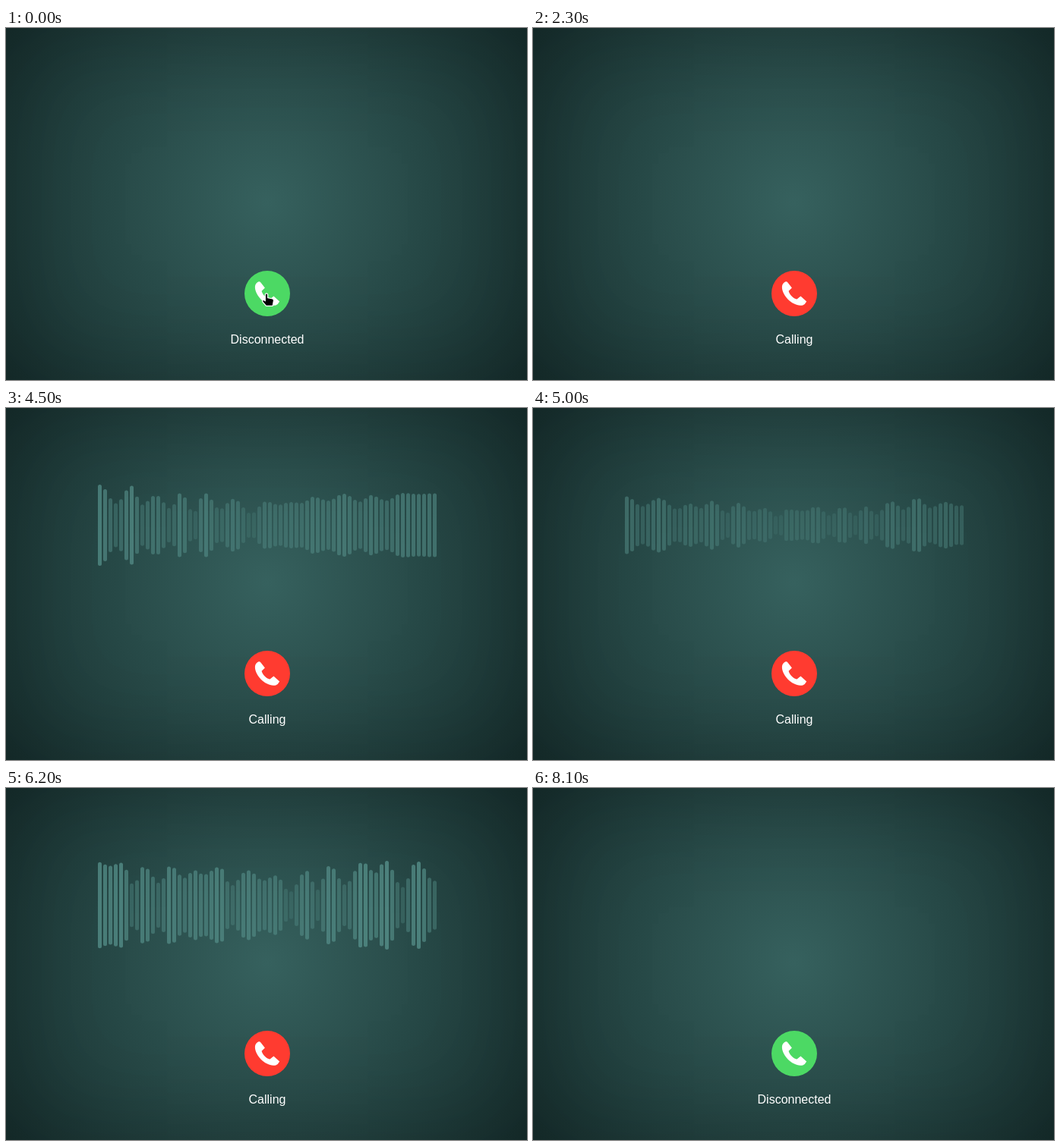
An HTML page for the animation above (9300 ms loop, 686 px wide and 464 px high).

```html
<!DOCTYPE html>
<html lang="en">
<head>
<meta charset="utf-8">
<title>Voice call</title>
<style>
  html, body { margin: 0; width: 100%; height: 100%; overflow: hidden; }
  body {
    background: radial-gradient(circle at 344px 230px, #36615e, #183130 415px);
    box-shadow: inset 0 0 150px rgba(0, 0, 0, .25);
  }
  svg { display: block; width: 686px; height: 464px; }
  text { font: 16px "Liberation Sans", Arial, sans-serif; fill: #fff; text-anchor: middle; }
  .bars { fill: #5a9690; }
  .button, text, .cursor { animation: 9300ms step-end infinite; }
  .button { animation-name: button; }
  .idle { animation-name: idle; }
  .matching { animation-name: matching; }
  .calling { animation-name: calling; }
  .hand { animation-name: hand; }
  .arrow { animation-name: arrow; }
  .cursor { fill: #000; stroke: #fff; stroke-width: 1.2; stroke-linejoin: round; }

  @keyframes button {
    0%, 80.64%, to { fill: #4cd964; }
    23.65%, 79.56% { fill: #a68a4a; }
    24.73% { fill: #ff3b30; }
  }
  @keyframes idle {
    0%, 79.56%, to { visibility: visible; }
    8.6% { visibility: hidden; }
  }
  @keyframes matching {
    0%, 23.65%, to { visibility: hidden; }
    8.6% { visibility: visible; }
  }
  @keyframes calling {
    0%, 79.56%, to { visibility: hidden; }
    23.65% { visibility: visible; }
  }
  @keyframes hand {
    0%, to { visibility: visible; transform: translate(343px, 350px); }
    2.15% { visibility: visible; transform: translate(349px, 358px); }
    10.75% { visibility: visible; transform: translate(330px, 358px); }
    11.82% { visibility: hidden; transform: none; }
    76.34% { visibility: visible; transform: translate(348px, 353px); }
    84.94% { visibility: hidden; transform: none; }
  }
  @keyframes arrow {
    0%, 12.9%, 76.34%, 87.09%, to { visibility: hidden; transform: none; }
    11.82% { visibility: visible; transform: translate(302px, 360px); }
    73.11% { visibility: visible; transform: translate(46px, 435px); }
    74.19% { visibility: visible; transform: translate(220px, 408px); }
    75.26% { visibility: visible; transform: translate(329.5px, 387px); }
    84.94% { visibility: visible; transform: translate(328px, 386px); }
    86.02% { visibility: visible; transform: translate(293px, 420px); }
  }
</style>
</head>
<body>
<svg viewBox="0 0 686 464">
  <g class="bars"></g>
  <circle class="button" cx="344" cy="350" r="30"/>
  <path fill="#fff" d="M331 335.2Q333.6 333.4 335.2 335.3L340.9 342.6 336.6 346.7C337.6 351.4 342.8 356.6 347.5 357.6L352.4 353.6 360.2 360.6Q358.4 364.3 355.2 365.4C349 367 341 363.2 335.5 357.6C329.6 351.5 326.6 343.2 328.4 338.6Q329.2 336.6 331 335.2Z"/>
  <text class="idle" x="344" y="416">Disconnected</text>
  <text class="matching" x="344" y="416">Matching</text>
  <text class="calling" x="344" y="416">Calling</text>
  <path class="cursor hand" d="M-1.7 1Q0-1.4 1.7 1V5.6L8 7Q9.7 7.6 9.4 9.5L8.2 16.3H-.5L-5.3 10.6Q-5.5 8-3 8.8L-1.7 9.8Z"/>
  <path class="cursor arrow" d="M0 0V16L3.8 12.6 6.6 19 9.4 17.8 6.6 11.6H11.4Z"/>
</svg>
<script>
  const LOOP = 9300, STEP = 100, BARS = 64, MIDDLE = 154.5;

  const bursts = [
    { start: 3200, end: 4100, tallest: 134 },
    { start: 4300, end: 5200, tallest: 149 },
    { start: 5300, end: 5500, tallest: 107 },
    { start: 5700, end: 6600, tallest: 149 },
    { start: 6700, end: 7400, tallest: 127 }
  ];

  function seeded(seed) {
    return () => {
      seed = (seed * 16807) % 2147483647;
      return seed / 2147483647;
    };
  }

  // Alternating peaks and troughs, louder mid-burst and lower towards the middle bars.
  function voicePoints(time, { start, end, tallest }) {
    const random = seeded(time * 7919);
    const progress = (time - start + STEP / 2) / (end - start);
    const level = tallest * (0.35 + 0.6 * Math.sin(Math.PI * progress) ** 2);
    const points = [];
    for (let bar = 0, peak = true; bar < BARS + 3; bar += 1.7 + random() * 1.6, peak = !peak) {
      const swell = 0.85 + 0.15 * Math.cos(2 * Math.PI * bar / BARS);
      const size = peak ? 0.8 + random() * 0.25 : 0.35 + random() * 0.45;
      points.push([bar, level * swell * size]);
    }
    return points;
  }

  function heightAt(points, bar) {
    const next = Math.max(1, points.findIndex(([x]) => x >= bar));
    const [x0, h0] = points[next - 1], [x1, h1] = points[next];
    const ease = (1 - Math.cos(Math.PI * (bar - x0) / (x1 - x0))) / 2;
    return h0 + (h1 - h0) * ease;
  }

  const group = document.querySelector(".bars");
  const bars = Array.from({ length: BARS }, (_, i) => {
    const bar = document.createElementNS(group.namespaceURI, "rect");
    bar.setAttribute("x", 121 + i * 7);
    bar.setAttribute("width", 5);
    bar.setAttribute("rx", 2.5);
    return group.appendChild(bar);
  });

  function drawWave(time) {
    const burst = bursts.find(({ start, end }) => time >= start && time < end);
    group.style.display = burst ? "" : "none";
    if (!burst) return;
    const points = voicePoints(time, burst);
    bars.forEach((bar, i) => {
      const height = heightAt(points, i);
      bar.setAttribute("y", MIDDLE - height / 2);
      bar.setAttribute("height", height);
      bar.setAttribute("opacity", height / 160);
    });
  }

  let begin;
  function tick(now) {
    begin ??= now;
    const time = (now - begin) % LOOP;
    drawWave(Math.floor(time / STEP) * STEP);
    requestAnimationFrame(tick);
  }
  requestAnimationFrame(tick);
</script>
</body>
</html>
```
